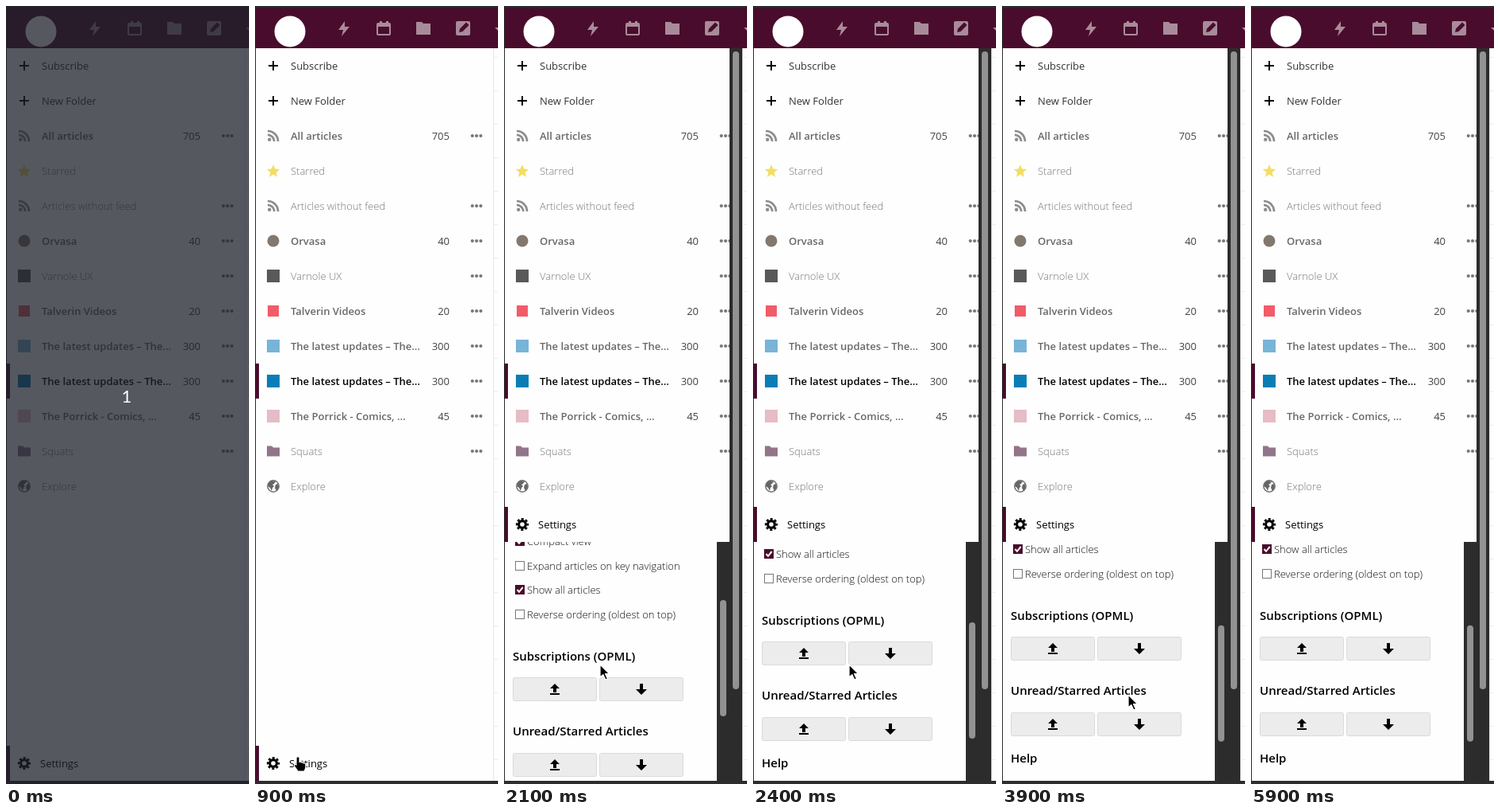
Animation, 306 px wide and 977 px high, one loop 6.3 s. Source, as an HTML page:

```html
<!DOCTYPE html>
<html lang="en">
<head>
<meta charset="utf-8">
<title>Feed reader settings</title>
<style>
  html, body { margin: 0; width: 100%; height: 100%; overflow: hidden; background: #fefefe; }
  svg { display: block; width: 306px; height: 977px; }
  foreignObject { overflow: visible; }
  p { margin: 0; white-space: nowrap; font: 400 13px/18px "Open Sans", "Noto Sans", sans-serif; }
  .light { font-weight: 300; }
  .bold { font-weight: 600; }
  .num { text-align: right; }
  .head { font-weight: 600; font-size: 15px; line-height: 20px; }
  .count { font: 400 22px Lato, sans-serif; }
</style>
</head>
<body>
<svg viewBox="0 0 306 977">
  <defs>
    <clipPath id="panelClip"><rect id="panelWindow" x="0" y="673" width="284" height="300"/></clipPath>
    <g id="gear">
      <circle r="4.4" fill="none" stroke="#000" stroke-width="3.2"/>
      <circle r="6.8" fill="none" stroke="#000" stroke-width="2.6" stroke-dasharray="2.9 2.44" stroke-dashoffset="1.4"/>
    </g>
  </defs>

  <rect width="306" height="977" fill="#fefefe"/>
  <g id="lines" stroke="#ececec"></g>
  <path d="M300.5 53V973" stroke="#e6e6e6"/>
  <g id="rows"></g>

  <g id="outerBar">
    <rect x="284" y="53" width="16" height="920" fill="#2c2c2c"/>
    <rect x="288" y="57" width="8" height="801" rx="4" fill="#929292"/>
  </g>

  <g id="drawer">
    <rect x="1" y="629" width="283" height="44" fill="#fefefe"/>
    <rect x="1" y="629" width="4" height="44" fill="#4a0c2c"/>
    <use href="#gear" x="23" y="651"/>
    <g id="drawerLabel"></g>
    <g id="panelBox" clip-path="url(#panelClip)">
      <rect x="1" y="673" width="283" height="300" fill="#fefefe"/>
      <g id="content"></g>
      <rect x="268" y="673" width="16" height="300" fill="#2c2c2c"/>
      <rect id="thumb" x="272" y="677" width="8" height="146" rx="4" fill="#929292"/>
    </g>
  </g>

  <g id="header">
    <rect y="2" width="306" height="51" fill="#4a0c2c"/>
    <rect width="306" height="2.5" fill="#2b2b2b"/>
    <circle cx="44" cy="32" r="19.5" fill="#fff"/>
    <g fill="#a88b9a">
      <path d="M113 19L105 30H111L109 38L119 26H113Z"/>
      <path fill-rule="evenodd" d="M155 21H157V19H160V21H165V19H168V21H169Q171 21 171 23V35Q171 37 169 37H155Q153 37 153 35V23Q153 21 155 21ZM155 26V35H169V26Z"/>
      <path d="M203 20H210L212 22H221V36H203Z"/>
      <rect x="253" y="19" width="18" height="18" rx="2"/>
      <path d="M302 27H310L306 31Z"/>
    </g>
    <path d="M257 33L258 28.5L266 20.5L269.5 24L261.5 32Z" fill="#4a0c2c"/>
  </g>
  <rect width="1" height="977" fill="#2b2b2b"/>
  <rect y="973" width="306" height="4" fill="#2d2d2d"/>

  <path id="cursor" fill="#000" stroke="#fff" stroke-width="1.2" stroke-linejoin="round"/>

  <g id="shade">
    <rect width="306" height="977" fill="#1d212a" fill-opacity=".75"/>
    <text class="count" x="152" y="498" text-anchor="middle" fill="#fff">1</text>
  </g>
</svg>
<script>
const $ = id => document.getElementById(id);
const LOOP = 6300, STEP = 100, MAROON = '#4a0c2c';

// Text is laid out as HTML; y is the middle of the line
const text = (x, y, s, cls = '', fill = '#000', width = 250) =>
  `<foreignObject x="${x}" y="${y - (cls === 'head' ? 11 : 9)}" width="${width}" height="20">
    <p xmlns="http://www.w3.org/1999/xhtml" class="${cls}" style="color:${fill}">${s}</p></foreignObject>`;
const square = (y, fill, size = 16) =>
  `<rect x="${23 - size / 2}" y="${y - size / 2}" width="${size}" height="${size}" fill="${fill}"/>`;
const at = (y, body) => `<g transform="translate(23 ${y})">${body}</g>`;

// Sidebar icons, drawn around their centre
const plus = y => at(y, '<path d="M-6 0H6M0-6V6" stroke="#000" stroke-width="2"/>');
const feed = y => at(y, `<g fill="none" stroke="#8c8c8c" stroke-width="2.7">
  <path d="M-7-6A13 13 0 0 1 6 7M-7-1.2A8.2 8.2 0 0 1 1.2 7"/></g>
  <circle cx="-4.8" cy="4.8" r="2.2" fill="#8c8c8c"/>`);
const star = y => {
  const pts = Array.from({ length: 10 }, (_, i) => {
    const r = i % 2 ? 3.9 : 8.6, a = i * Math.PI / 5;
    return `${(r * Math.sin(a)).toFixed(2)},${(0.7 - r * Math.cos(a)).toFixed(2)}`;
  });
  return at(y, `<polygon points="${pts.join(' ')}" fill="#f2de64"/>`);
};
const folder = y => at(y, '<path d="M-8-6.5H-2L0-4.5H8V6.5H-8Z" fill="#93758a"/>');
const globe = y => at(y, `<circle r="7.2" fill="#fefefe" stroke="#707070" stroke-width="1.5"/>
  <path d="M-6-4L-2-7L3-6L1-3L-1-2L1 0L-1 2L-2 6L-4 2L-7 0ZM3-2L6-3L7 1L4 6L2 2Z" fill="#666"/>`);
const disc = y => `<circle cx="23" cy="${y}" r="7.5" fill="#82786e"/>`;

// [label, icon, style, colour, count, has menu]
const DIM = '#686868', FAINT = '#777';
const rows = [
  ['Subscribe', plus, '', '#333'],
  ['New Folder', plus, '', '#333'],
  ['All articles', feed, 'bold', DIM, 705, 1],
  ['Starred', star, 'light', FAINT],
  ['Articles without feed', feed, 'light', FAINT, '', 1],
  ['Orvasa', disc, 'bold', DIM, 40, 1],
  ['Varnole UX', y => square(y, '#595959'), 'light', FAINT, '', 1],
  ['Talverin Videos', y => square(y, '#f15c68', 14), 'bold', DIM, 20, 1],
  ['The latest updates – The…', y => square(y, '#78b4d8'), 'bold', DIM, 300, 1],
  ['The latest updates – The…', y => square(y, '#0b7db6'), 'bold', '#000', 300, 1],
  ['The Porrick - Comics, …', y => square(y, '#e6bcc6'), 'bold', DIM, 45, 1],
  ['Squats', folder, 'light', FAINT, '', 1],
  ['Explore', globe, 'light', FAINT]
];

$('rows').innerHTML = `<rect x="1" y="449" width="4" height="44" fill="${MAROON}"/>` +
  rows.map(([label, icon, cls, fill, count, menu], i) => {
    const y = 75 + 44 * i;
    let s = icon(y) + text(45, y, label, cls, fill);
    if (count) s += text(205, y, count, 'num', '#444', 40);
    if (menu) s += [273.7, 279, 284.3].map(x => `<circle cx="${x}" cy="${y}" r="2.1" fill="#777"/>`).join('');
    return s;
  }).join('');
$('drawerLabel').innerHTML = text(43, 651, 'Settings');

for (let y = 64; y < 973; y += 42)
  $('lines').innerHTML += `<path d="M301 ${y + .5}H306"/>`;

// Settings panel at scroll position 0
const options = [
  ['Disable mark read through scrolling', 0],
  ['Compact view', 1],
  ['Expand articles on key navigation', 0],
  ['Show all articles', 1],
  ['Reverse ordering (oldest on top)', 0]
];
const option = ([label, on], i) => {
  const y = Math.floor(753 + 30.5 * i);
  return `<rect x="14.5" y="${y - 5.5}" width="11" height="11" fill="${on ? MAROON : '#fff'}" stroke="${on ? MAROON : '#777'}"/>` +
    (on ? `<path d="M16.5 ${y}L19 ${y + 2.8}L23.7 ${y - 3}" fill="none" stroke="#fff" stroke-width="2"/>` : '') +
    text(29, y, label, 'light', '#111');
};
const buttons = [[11, 954], [120, 954], [11, 1049], [120, 1049]];
const button = ([x, y]) => {
  const icon = x < 100
    ? 'M0-7L6-1H2V4H-2V-1H-6ZM-6 5H6V7H-6Z'
    : 'M0 7L-7 0H-2V-7H2V0H7Z';
  return `<rect class="btn" x="${x + .5}" y="${y + .5}" width="105" height="29" rx="2" fill="#ececec" stroke="#dadada"/>
    <path d="${icon}" transform="translate(${x + 53} ${y + 15})"/>`;
};
$('content').innerHTML =
  text(11, 711, 'Settings', 'head') +
  options.map(option).join('') +
  text(11, 928, 'Subscriptions (OPML)', 'head') +
  text(11, 1022, 'Unread/Starred Articles', 'head') +
  text(11, 1107, 'Help', 'head') +
  buttons.map(button).join('');
const frames = [...document.querySelectorAll('.btn')];

// Motion tables: [ms, values...]
const pointer = [
  [100, 203, 947], [200, 203, 947], [300, 170, 941], [400, 120, 939], [500, 80, 941],
  [600, 58, 944], [700, 58, 944], [800, 54, 943], [1300, 54, 943],
  [1400, 63, 925], [1500, 93, 868], [1600, 121, 827], [2500, 121, 827],
  [2700, 146, 813], [2900, 177, 799], [3100, 190, 807], [3400, 172, 806], [3500, 172, 806],
  [3800, 164, 852], [4200, 144, 905], [4400, 179, 906], [4500, 179, 906],
  [4600, 183, 904], [4700, 168, 904], [4900, 174, 901], [5000, 174, 901], [5100, 190, 940]
];
const scroll = [[1700, 0], [1800, 12], [1900, 45], [2000, 81], [2100, 111],
  [2200, 132], [2300, 146], [2400, 156], [2500, 162]];
const height = [[900, 0], [1000, 150], [1100, 300]];

function sample(table, t) {
  const i = table.findIndex(k => k[0] > t);
  if (i === 0) return table[0].slice(1);
  if (i < 0) return table[table.length - 1].slice(1);
  const a = table[i - 1], b = table[i], f = (t - a[0]) / (b[0] - a[0]);
  return a.slice(1).map((v, n) => v + (b[n + 1] - v) * f);
}

const HAND = 'M-2 1Q0-1.5 2 1V6.5Q3.5 5.3 4.6 7Q6 6.2 7 7.8Q9.8 7.4 9.8 10V14L8 18H0L-4.5 11.5Q-5 8.5-2 10Z';
const ARROW = 'M0 0V16L3.8 12.6L6.8 19L9.4 17.8L6.5 11.6H11.5Z';
const show = (id, on) => $(id).setAttribute('visibility', on ? 'visible' : 'hidden');

function draw(time) {
  const t = Math.floor(time / STEP) * STEP;
  const [x, y] = sample(pointer, t).map(Math.round);
  const [top] = sample(scroll, t).map(Math.round);
  const [h] = sample(height, t);
  const open = h > 0;

  show('shade', t < 100);
  show('outerBar', open);
  show('panelBox', open);
  $('drawer').setAttribute('transform', `translate(0 ${300 - h})`);
  $('panelWindow').setAttribute('height', h);
  $('content').setAttribute('transform', `translate(0 ${-top})`);
  $('thumb').setAttribute('y', 677 + top * .6225);

  const py = y + top;
  let hand = open ? x < 240 && py > 738 && py < 890 : y > 929;
  frames.forEach((el, i) => {
    const [bx, by] = buttons[i];
    const over = open && t < 5100 && x > bx + 2 && x < bx + 104 && py >= by && py <= by + 30;
    el.setAttribute('stroke', over ? MAROON : '#dadada');
    hand = hand || over;
  });

  show('cursor', t >= 100 && t < 5200);
  $('cursor').setAttribute('d', hand ? HAND : ARROW);
  $('cursor').setAttribute('transform', `translate(${x} ${y})`);
}

const start = performance.now();
function tick() {
  draw((performance.now() - start) % LOOP);
  requestAnimationFrame(tick);
}
tick();
</script>
</body>
</html>
```
